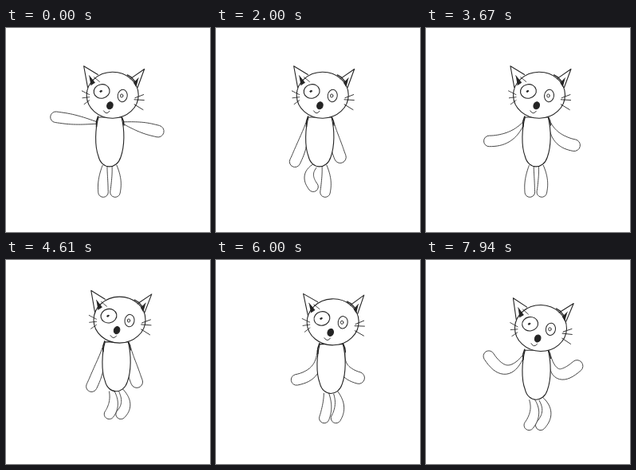
Recreate the animation shown at these times as an HTML page with a canvas. Size 256 by 256 pixels, loop 8000 ms.

```html
<!DOCTYPE html>
<html lang="en">
<head>
<meta charset="utf-8">
<title>Dancing cat</title>
<style>
html, body { margin: 0; width: 100%; height: 100%; overflow: hidden; background: #fff; }
canvas { display: block; width: 256px; height: 256px; }
</style>
</head>
<body>
<canvas id="stage"></canvas>
<script>
const LOOP = 8000;
const BEAT = 1200;
const INK = '#242424';
const SOFT = '#484848';
const { PI, sin, cos, abs, min, max } = Math;
const canvas = document.getElementById('stage');
const ctx = canvas.getContext('2d');
const ratio = window.devicePixelRatio || 1;
canvas.width = canvas.height = 256 * ratio;

const mix = (a, b, k) => a + (b - a) * k;

// Eased 0 to 1 between two times.
const ramp = (t, from, to) => (1 - cos(PI * min(1, max(0, (t - from) / (to - from))))) / 2;

// Eased up from a to b, held, eased down from c to d.
const bump = (t, a, b, c, d) => ramp(t, a, b) - ramp(t, c, d);

function poseAt(t) {
  const dance = ramp(t, 4060, 4360);
  const beat = 2 * PI * (t - 6760) / BEAT;
  const jump = abs(sin(beat)) * dance;
  const stride = cos(2 * PI * (t - 2720) / 1140) * bump(t, 1700, 2000, 3300, 3700);
  const rest = bump(t, 1280, 1660, 3390, 3900) + bump(t, 4180, 4600, 4800, 5250)
    + 0.74 * bump(t, 5500, 6000, 6000, 6450);
  const loose = 14 * ramp(t, 0, 1280) + 20 * ramp(t, 4200, 5200);
  return {
    x: 8.3 * ramp(t, 2800, 3400) - 2.5 * bump(t, 2000, 2600, 2800, 3300)
      + 6 * bump(t, 4610, 5600, 6000, 7200),
    y: 2.5 * dance - 12 * jump,
    lead: 2 * cos(beat) * dance - 0.8,
    armAngle: mix(loose / 4 - 8, 73, rest),
    armBend: mix(loose, 4, rest ** 3),
    flex: (0.7 + 0.3 * cos(beat)) * dance,
    tuck: 4 * jump ** 4,
    kickLeft: max(0, -stride),
    kickRight: max(0, stride)
  };
}

function ink(width, color = INK) {
  ctx.lineWidth = width;
  ctx.strokeStyle = color;
  ctx.stroke();
}

function line(points, width = 0.9) {
  ctx.beginPath();
  for (let i = 0; i < points.length; i += 2) ctx.lineTo(points[i], points[i + 1]);
  ink(width);
}

function oval(x, y, rx, ry, width, turn = 0) {
  ctx.beginPath();
  ctx.ellipse(x, y, rx, ry, turn, 0, PI * 2);
  ctx.fill();
  ink(width);
}

// A soft limb: a bent centre line that widens into a round end.
function limb(x0, y0, cx, cy, x1, y1, thin, thick) {
  const steps = 18;
  const left = [], right = [];
  let angle = 0;
  for (let i = 0; i <= steps; i++) {
    const u = i / steps, v = 1 - u;
    const x = v * v * x0 + 2 * u * v * cx + u * u * x1;
    const y = v * v * y0 + 2 * u * v * cy + u * u * y1;
    angle = Math.atan2(v * (cy - y0) + u * (y1 - cy), v * (cx - x0) + u * (x1 - cx));
    const r = mix(thin, thick, sin(min(1, u * 1.2) * PI / 2));
    const nx = -sin(angle) * r, ny = cos(angle) * r;
    left.push([x + nx, y + ny]);
    right.unshift([x - nx, y - ny]);
  }
  ctx.beginPath();
  left.forEach(p => ctx.lineTo(...p));
  ctx.arc(x1, y1, thick, angle + PI / 2, angle - PI / 2, true);
  right.forEach(p => ctx.lineTo(...p));
  ctx.fill();
  ink(1, SOFT);
}

// side is -1 for left, 1 for right; the angle is measured down from level.
function arm(x, y, side, degrees, bend, length, thick) {
  const a = degrees * PI / 180;
  const reach = length - bend / 4;
  const dx = side * cos(a) * reach, dy = sin(a) * reach;
  limb(x, y,
    x + dx / 2 - side * sin(a) * bend, y + dy / 2 + cos(a) * bend,
    x + dx, y + dy, 1.2, thick);
}

function leg(x, knee, foot, kick, swing, tuck) {
  limb(x, 173,
    x + mix(knee, swing, kick), 190 - 8 * kick,
    x + foot, 206 - 10 * kick - tuck, 3, 6.3);
}

function drawBody() {
  ctx.beginPath();
  ctx.moveTo(116, 112);
  ctx.bezierCurveTo(112, 126, 111, 148, 116, 161);
  ctx.bezierCurveTo(120, 178, 139, 178, 144, 162);
  ctx.bezierCurveTo(149, 148, 149, 128, 145, 112);
  ctx.closePath();
  ctx.fill();
  ink(1.1);
  line([115.5, 111, 113.5, 117, 113.5, 124], 1.5);
  line([145, 111, 147.5, 117, 148, 122], 1.4);
}

function ear(outline, shade) {
  line(outline, 1.1);
  ctx.fillStyle = INK;
  line(shade, 0.8);
  ctx.fill();
}

// Drawn around the middle of the face.
function drawHead() {
  ctx.fillStyle = '#fff';
  oval(0, 0, 32.5, 29, 1.1);

  ear([-31, -10, -35.5, -37, -18, -26], [-29, -25, -22, -16, -27, -13]);
  ear([22.5, -20, 40.5, -32, 31.5, -9], [33, -21, 27, -15, 30, -10]);
  line([19, -25, 24, -22, 29, -16], 1.3);
  line([-23, -23, -16, -17], 0.8);

  ctx.fillStyle = '#fff';
  oval(-13.5, -5, 10, 8.7, 1.1, -0.2);
  oval(12.5, 1, 6, 7.7, 1, 0.15);
  oval(11.5, 1, 1.7, 2.1, 0.9);
  ctx.fillStyle = INK;
  oval(-14.5, -5, 1.5, 0.9, 0.8, -0.4);
  oval(-3.5, 13, 3.7, 4.6, 1, 0.35);

  ctx.beginPath();
  ctx.moveTo(-11.5, 19.5);
  ctx.quadraticCurveTo(-8, 25.5, -4, 20);
  ink(0.9);

  line([28, 4, 39, 0]);
  line([27, 6, 39.5, 7]);
  line([27, 12, 38, 19]);
  line([-38.5, -6, -29, -1], 0.8);
  line([-38, 3, -29, 2], 0.8);
  line([-36, 11, -29, 6], 0.8);
}

function draw(t) {
  const p = poseAt(t);

  ctx.setTransform(ratio, 0, 0, ratio, 0, 0);
  ctx.fillStyle = '#fff';
  ctx.fillRect(0, 0, 256, 256);
  ctx.lineCap = ctx.lineJoin = 'round';

  ctx.save();
  ctx.translate(p.x, p.y);
  leg(136, mix(4, 14, p.flex), mix(1, -0.5, p.flex), p.kickRight, 20, p.tuck);
  leg(124, mix(-3, 9, p.flex), mix(-2, -3, p.flex), p.kickLeft, -18, p.tuck);
  arm(114, 119, -1, p.armAngle, p.armBend, 52, 6.8);
  arm(147, 119, 1, 20 + 0.8 * p.armAngle, p.armBend, 45, 7.4);
  drawBody();
  ctx.restore();

  // The head tips with its lead over the body.
  ctx.save();
  ctx.translate(p.x + p.lead + 134.5, p.y + 84.2);
  ctx.rotate(p.lead * 0.02);
  drawHead();
  ctx.restore();
}

function frame() {
  draw(performance.now() % LOOP);
  requestAnimationFrame(frame);
}
frame();
</script>
</body>
</html>
```
